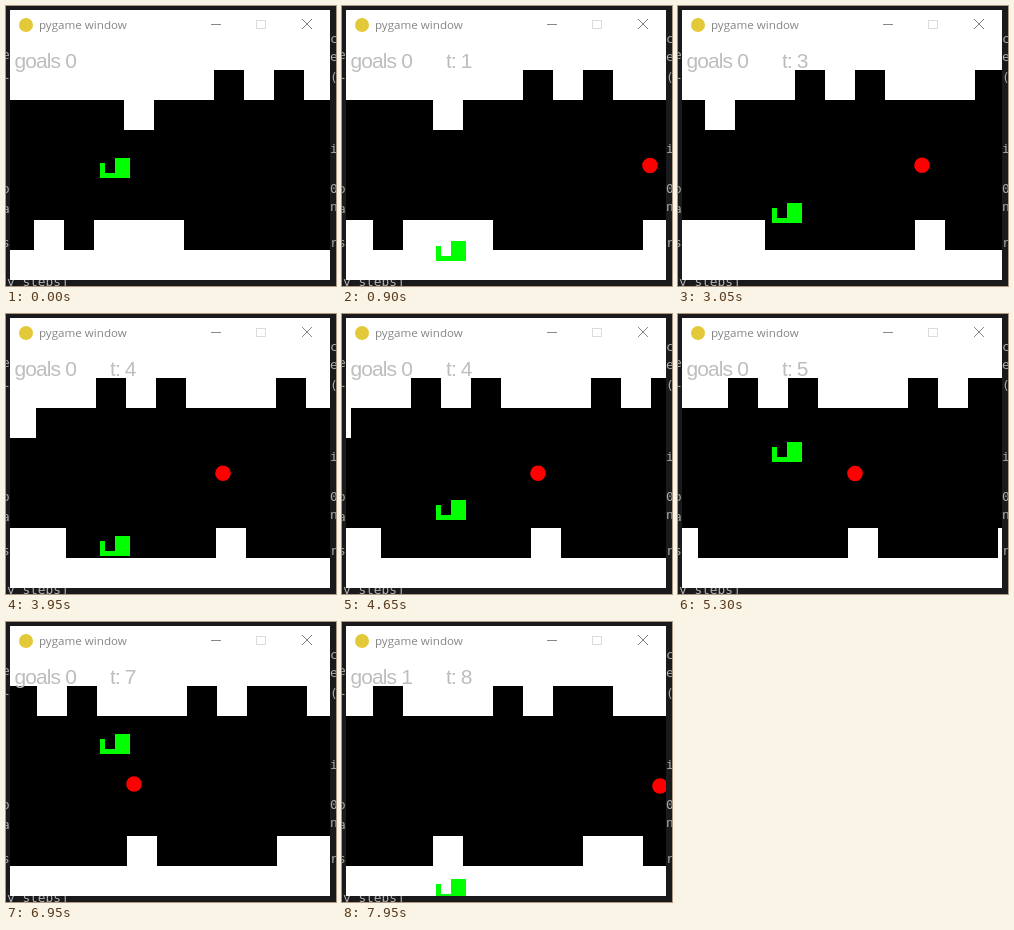
These frames come from a looping animation (330x280 px, 8000 ms). An HTML page with a canvas:

```html
<!DOCTYPE html>
<html lang="en">
<head>
<meta charset="utf-8">
<title>Cave runner</title>
<style>
  html, body { margin: 0; width: 100%; height: 100%; overflow: hidden; background: #1a1a1d; }
  canvas { display: block; }
</style>
</head>
<body>
<canvas id="stage" width="330" height="280"></canvas>
<script>
const ctx = document.getElementById('stage').getContext('2d');
const LOOP = 8000, STEP = 50, SCROLL_SPEED = 0.0298;
const WIN = { x: 4, y: 4, w: 320, h: 270 };
const CELL = 30, FIRST_CELL_X = 28;

// Cave layout by column index
const ceilingNotches = [6, 8, 12, 14, 15];
const ceilingBlocks = [3];
const floorBlocks = [0, 2, 3, 4, 10, 15, 16];

const PICKUP_TIME = 7200;
const playerPath = [
  [0, 152], [650, 241], [900, 235], [1500, 206], [2150, 186], [3000, 196], [3950, 222],
  [4200, 228], [5300, 128], [6050, 130], [6950, 112], [7600, 240], [7950, 257]
];
const goalPath = [[0, 159.5], [5300, 159.5], [6950, 162], [8000, 162]];

// Smooth curve through [time, value] points
function curve(points, t) {
  const last = points.length - 1;
  let i = 0;
  while (i < last - 1 && t >= points[i + 1][0]) i++;
  const slope = k => {
    const a = points[Math.max(k - 1, 0)], b = points[Math.min(k + 1, last)];
    return (b[1] - a[1]) / (b[0] - a[0]);
  };
  const [t0, v0] = points[i], [t1, v1] = points[i + 1];
  const span = t1 - t0, u = (t - t0) / span, w = 1 - u;
  return v0 * (1 + 2 * u) * w * w + slope(i) * span * u * w * w
       + v1 * u * u * (3 - 2 * u) - slope(i + 1) * span * u * u * w;
}

function rect(x, y, w, h, color) {
  ctx.fillStyle = color;
  ctx.fillRect(x, y, w, h);
}

function disc(x, y, r, color) {
  ctx.fillStyle = color;
  ctx.beginPath();
  ctx.arc(x, y, r, 0, Math.PI * 2);
  ctx.fill();
}

function text(str, x, y, font, color, spacing = 0) {
  ctx.font = font;
  ctx.letterSpacing = spacing + 'px';
  ctx.fillStyle = color;
  ctx.fillText(str, x, y);
}

function line(color, ...points) {
  ctx.strokeStyle = color;
  ctx.lineWidth = 1;
  ctx.beginPath();
  points.forEach(([x, y], i) => i % 2 ? ctx.lineTo(x, y) : ctx.moveTo(x, y));
  ctx.stroke();
}

function drawTerminal() {
  const font = '12.8px "DejaVu Sans Mono", monospace';
  rect(0, 0, 330, 280, '#1a1a1d');
  [[53, 'e'], [73, 'l'], [187, 'o'], [207, 'a'], [241, 's']]
    .forEach(([y, s]) => text(s, -4, y, font, '#aaa'));
  [[37, 'c'], [55, 'e'], [75, '('], [147, 'i'], [187, '0'], [205, 'n'], [241, 'r']]
    .forEach(([y, s]) => text(s, 324, y, font, '#aaa'));
  text('y steps]', 1, 280, font, '#b4b4b4');
}

function drawTitleBar() {
  disc(20, 19, 7, '#e3c93a');
  text('pygame window', 33, 23, '11.6px "Open Sans", sans-serif', '#858585');
  line('#858585', [205, 18.5], [215, 18.5]);
  ctx.strokeStyle = '#dcdcdc';
  ctx.strokeRect(250.5, 14.5, 9, 8);
  line('#858585', [296, 13], [306, 23], [306, 13], [296, 23]);
}

function drawCave(shift) {
  const cells = (columns, y, color) => columns.forEach(
    c => rect(FIRST_CELL_X + c * CELL - shift, y, CELL, CELL, color));
  rect(WIN.x, 94, WIN.w, 150, '#000');
  cells(ceilingNotches, 64, '#000');
  cells(ceilingBlocks, 94, '#fff');
  cells(floorBlocks, 214, '#fff');
}

function drawPlayer(y) {
  rect(94, y + 5, 5, 15, '#0f0');
  rect(99, y + 15, 10, 5, '#0f0');
  rect(109, y, 15, 20, '#0f0');
}

function drawScore(goals, seconds) {
  const font = '21px "Liberation Sans", Arial, sans-serif';
  text('goals ' + goals, 8.5, 62, font, '#bebebe', -0.9);
  if (seconds > 0) text('t: ' + seconds, 104, 62, font, '#bebebe', -0.9);
}

function draw(t) {
  const shift = Math.round(t * SCROLL_SPEED);
  const goals = t >= PICKUP_TIME ? 1 : 0;
  drawTerminal();
  ctx.save();
  ctx.beginPath();
  ctx.rect(WIN.x, WIN.y, WIN.w, WIN.h);
  ctx.clip();
  rect(WIN.x, WIN.y, WIN.w, WIN.h, '#fff');
  drawTitleBar();
  drawCave(shift);
  if (goals) disc(555 - shift, 164, 7.8, '#f00');
  else disc(335 - shift, curve(goalPath, t), 7.8, '#f00');
  drawPlayer(Math.round(curve(playerPath, t)));
  drawScore(goals, Math.floor((shift + 6) / CELL));
  ctx.restore();
}

const start = performance.now();
function tick() {
  const t = (performance.now() - start) % LOOP;
  draw(Math.floor(t / STEP) * STEP);
  requestAnimationFrame(tick);
}
tick();
</script>
</body>
</html>
```
